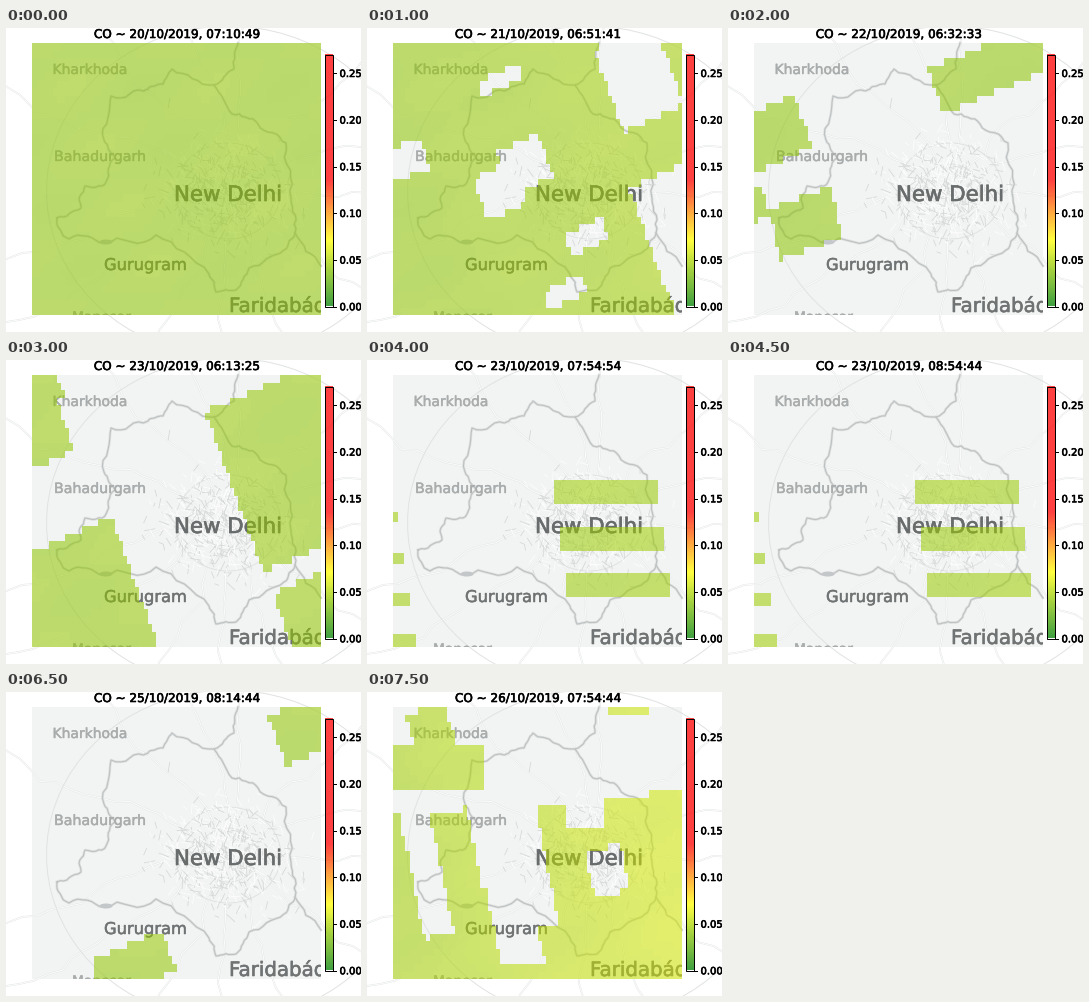
Animation, 355 px wide and 304 px high, one loop 8 s. Source, as a matplotlib script:

```python
import numpy as np
import matplotlib.pyplot as plt
from matplotlib.animation import FuncAnimation
from matplotlib.collections import LineCollection
from matplotlib.colors import LinearSegmentedColormap
from matplotlib.path import Path
from matplotlib.patches import Ellipse, Rectangle
from matplotlib.patheffects import Normal, Stroke

W, H, DPI = 355, 304, 64
PT = 72 / DPI
LEFT, TOP, RIGHT, BOTTOM = 26, 15, 315, 287
VMAX, FAR = 0.27, 300
CITY = np.array([222, 163])

rng = np.random.default_rng(7)
cmap = LinearSegmentedColormap.from_list(
    "co", [(0, "green"), (0.26, "yellow"), (0.5, "red"), (1, "red")])

fig = plt.figure(figsize=(W / DPI, H / DPI), dpi=DPI, facecolor="white")
ax = fig.add_axes([0, 0, 1, 1])
ax.axis("off")
frame = Rectangle((LEFT, TOP), RIGHT - LEFT, BOTTOM - TOP, fc="#f2f3f3", ec="none")
ax.add_patch(frame)


def outline(width, color):
    return [Stroke(linewidth=width * PT, foreground=color), Normal()]


def rough(points, depth, amount):
    """Subdivide a line with small random sideways offsets."""
    p = np.array(points, float)
    for _ in range(depth):
        d = np.diff(p, axis=0)
        side = np.c_[-d[:, 1], d[:, 0]] * rng.uniform(-amount, amount, (len(d), 1))
        out = np.empty((2 * len(p) - 1, 2))
        out[::2] = p
        out[1::2] = (p[:-1] + p[1:]) / 2 + side
        p = out
    return p


def line(points, color, lw, z):
    ax.plot(*np.asarray(points).T, color=color, lw=lw * PT, zorder=z, clip_path=frame)


# base map ----------------------------------------------------------------

def draw_roads():
    for a in np.arange(0, 2 * np.pi, 0.5) + rng.uniform(-0.15, 0.15, 13):
        ray = np.array([np.cos(a), np.sin(a)])
        p = rough([CITY + 20 * ray, CITY + 260 * ray], 4, 0.12)
        line(p, "#e1e3e3", 1.7, 1)
        line(p, "#fcfcfc", 1, 1.1)
    a = np.linspace(0, 2 * np.pi, 80)
    for r in (27, 48, 165):
        line(CITY + r * np.c_[1.1 * np.cos(a), np.sin(a)], "#e1e3e3", 1, 1.1)

    # dense streets of the city
    n = 620
    c = rng.normal(CITY, (30, 27), (n, 2))
    a = rng.choice([0.35, 1.92, 1.1], n) + rng.normal(0, 0.25, n)
    half = rng.uniform(2, 6, (n, 1)) * np.c_[np.cos(a), np.sin(a)]
    shades = np.where(rng.random(n) < 0.45, "#d6d8d8", "#fdfdfd")
    ax.add_collection(LineCollection(np.stack([c - half, c + half], 1), colors=shades,
                                     linewidths=0.8 * PT, zorder=1.2, clip_path=frame))


def draw_border():
    border = [
        (51, 190), (75, 180), (79, 158), (100, 154), (109, 130), (98, 112), (105, 68),
        (142, 61), (157, 56), (166, 41), (208, 57), (226, 86), (252, 96), (280, 115),
        (285, 170), (289, 205), (278, 222), (243, 240), (230, 262), (210, 264),
        (203, 246), (150, 207), (98, 215), (63, 211), (51, 190),
    ]
    for pts in (border, [(208, 57), (228, 41), (232, 15)], [(289, 205), (315, 238)]):
        p = rough(pts, 3, 0.16)
        line(p, "#dfe1e1", 2.6, 2)
        line(p, "#bec1c1", 1.1, 2.1)
    ax.add_patch(Ellipse((100, 214), 13, 5, fc="#c3c7c9", ec="none", zorder=2.2))


def draw_labels():
    for x, y, text, size, color in [
            (168, 173, "New Delhi", 21.3, "#696c6c"),
            (98, 242, "Gurugram", 16.3, "#707373"),
            (223, 284, "Faridabád", 19.8, "#707373"),
            (46.5, 46, "Kharkhoda", 13.9, "#a9acac"),
            (48, 133, "Bahadurgarh", 14.2, "#a9acac"),
            (66, 293.5, "Manesar", 13.8, "#a9acac")]:
        t = ax.text(x, y, text, size=size * PT, color=color, zorder=4, clip_on=True,
                    path_effects=outline(size * 0.03, color))
        t.set_clip_path(frame)


def draw_colorbar():
    x0, x1, y0, y1 = 318.5, 326.5, 26.5, 278.5
    ax.imshow(np.linspace(1, 0, 252)[:, None], cmap=cmap, alpha=0.75, aspect="auto",
              extent=(x0, x1, y1, y0), zorder=5)
    ax.add_patch(Rectangle((x0, y0), x1 - x0, y1 - y0, fill=False, ec="black",
                           lw=PT, zorder=6))
    for v in np.arange(0, 0.26, 0.05):
        y = y1 - v / VMAX * (y1 - y0)
        ax.plot([x1, x1 + 3.5], [y, y], color="black", lw=PT, zorder=6)
        ax.text(x1 + 7, y + 3.8, f"{v:.2f}", size=10 * PT,
                path_effects=outline(0.6, "black"), zorder=6)


# satellite coverage ------------------------------------------------------

def box(x0, y0, x1, y1):
    return [(x0, y0), (x1, y0), (x1, y1), (x0, y1)]


def quad(x, y, scan, track, tilt=0.45, lean=0.37):
    """Footprint from one corner, along the scan and along the flight track."""
    dx, dy = lean * track, track
    return [(x, y), (x + scan, y - tilt * scan),
            (x + scan + dx, y - tilt * scan + dy), (x + dx, y + dy)]


px, py = np.meshgrid(np.arange(LEFT, RIGHT) + 0.5, np.arange(TOP, BOTTOM) + 0.5)


def cover(polys, holes=(), cell=(4.13, 7.56), level=0.6, tilt=0.0):
    """RGBA overlay of polygons snapped to the measuring cells."""
    cx = LEFT + (np.floor((px - LEFT) / cell[0]) + 0.5) * cell[0]
    cy = TOP + (np.floor((py - TOP) / cell[1]) + 0.5) * cell[1]
    pts = np.c_[cx.ravel(), cy.ravel()]

    def inside(group):
        hit = np.zeros(len(pts), bool)
        for poly in group:
            hit |= Path(poly + poly[:1]).contains_points(pts)
        return hit.reshape(px.shape)

    wave = 0.02 * np.sin(cx / 23 + cy / 31) * np.cos(cy / 19)
    t = level + tilt * (cx - 170) / 145 + wave
    img = cmap(np.clip(t, 0, 1) * 0.26)
    img[..., 3] = 0.55 * (inside(polys) & ~inside(holes))
    return img


def blend(base, top):
    return np.where(top[..., 3:] > 0, top, base)


ALL = [box(LEFT, TOP, RIGHT, BOTTOM)]
FINE = (1, 1)

full = cover(ALL, level=0.57)

gaps = [quad(110, 54, 40, 14), quad(227, 22, 60, 82), quad(130, 124, 40, 42),
        quad(105, 150, 40, 43), quad(198, 207, 36, 20), quad(262, 160, FAR, FAR),
        quad(176, 263, 38, 18)]
holed = cover(ALL, gaps + [quad(53, 113, -FAR, 30, 0.2)], level=0.61, tilt=0.04)
filled = cover(ALL, gaps, level=0.61, tilt=0.04)

sparse = cover([quad(66, 67, -FAR, 52), quad(31, 155, -FAR, 32),
                quad(102, 159, -62, 50, 0.35, 0.25), quad(200, 42, FAR, 45)], level=0.56)

wide = cover([quad(105, 157, -FAR, FAR), quad(199, 52, FAR, 160),
              quad(267, 234, FAR, FAR), quad(69, 90, -FAR, -50),
              quad(58, 36, -FAR, -FAR)], level=0.58)

stripes = [box(187 + 6 * k, 120 + 46.5 * k, 291 + 6 * k, 144 + 46.5 * k) for k in range(3)]
stubs = [box(LEFT, 152 + 40.5 * k, 31 + 6 * k, 162 + 42 * k) for k in range(4)]
bands = cover(stripes + stubs, cell=FINE, level=0.62)

block = [box(156 + 5 * k, 143 + 23 * k, 238 + 5 * k, 166 + 23 * k) for k in range(5)]
steps = [box(301 + 4.5 * k, 15 + 24 * k, 315, 39 + 24 * k) for k in range(3)]
yellow = cover(block, cell=FINE, level=0.98)
small = cover(steps[2:], cell=FINE, level=0.62)
edge = cover(steps, cell=FINE, level=0.62)

south = cover([quad(85, 270, 70, 40), quad(262, 25, 100, 50)], level=0.58)

flat = dict(tilt=0.1, lean=0.2)
broad = cover(
    [quad(38, 25, 36, 50), box(26, 56, 116, 96), box(242, 15, 280, 20),
     quad(26, 120, FAR, FAR, 0.07, 0)],
    [quad(30, 110, 30, 136, **flat), box(60, 97, 98, 122),
     quad(97, 105, 68, 90, **flat), quad(118, 192, 65, 48, **flat),
     quad(128, 238, 42, 35, **flat), box(165, 97, 236, 116), box(200, 116, 236, 134),
     quad(218, 157, 36, 46, **flat)],
    level=0.74, tilt=0.1)

scenes = [
    ("20/10/2019, 07:10:49", full), ("20/10/2019, 08:09:44", full),
    ("21/10/2019, 06:51:41", holed), ("21/10/2019, 07:49:44", filled),
    ("22/10/2019, 06:32:33", sparse), ("22/10/2019, 07:29:44", sparse),
    ("23/10/2019, 06:13:25", wide), ("23/10/2019, 07:09:44", wide),
    ("23/10/2019, 07:54:54", bands), ("23/10/2019, 08:54:44", bands),
    ("24/10/2019, 07:35:46", blend(yellow, small)),
    ("24/10/2019, 08:34:44", blend(yellow, edge)),
    ("25/10/2019, 07:16:38", south), ("25/10/2019, 08:14:44", south),
    ("26/10/2019, 06:57:30", broad), ("26/10/2019, 07:54:44", broad),
]

draw_roads()
draw_border()
draw_labels()
draw_colorbar()
overlay = ax.imshow(full, extent=(LEFT, RIGHT, BOTTOM, TOP), aspect="auto",
                    interpolation="nearest", zorder=4.5)
title = ax.text(170.5, 10, "", size=12 * PT, ha="center",
                path_effects=outline(0.6, "black"), zorder=6)
ax.set_xlim(0, W)
ax.set_ylim(H, 0)


def update(i):
    stamp, img = scenes[i]
    title.set_text("CO ~ " + stamp)
    overlay.set_data(img)
    return overlay, title


anim = FuncAnimation(fig, update, frames=len(scenes), interval=500, repeat=True,
                     repeat_delay=0, blit=False)
plt.show()
```
